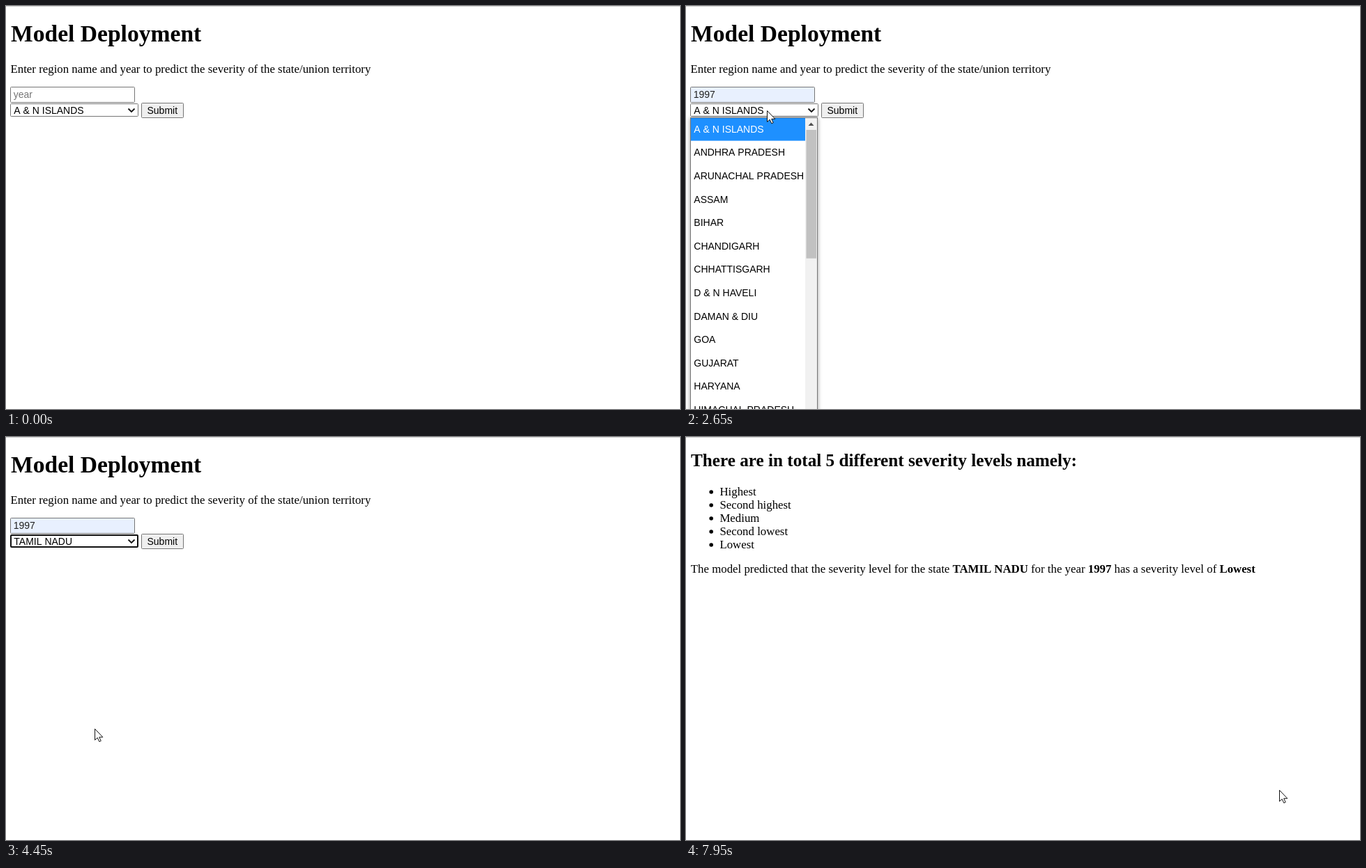
An HTML page with a canvas that plays this animation: 967x579 px, repeating every 8000 ms.

```html
<!DOCTYPE html>
<html lang="en">
<head>
<meta charset="utf-8">
<title>Model Deployment</title>
<style>
  html, body { margin: 0; width: 100%; height: 100%; overflow: hidden; background: #fff; }
  canvas { display: block; }
</style>
</head>
<body>
<canvas id="stage" width="967" height="579"></canvas>
<script>
const ctx = document.getElementById('stage').getContext('2d');
const W = 967, H = 579, LOOP = 8000;
const SERIF = '"Liberation Serif", "Times New Roman", serif';
const SANS = '"Liberation Sans", Arial, sans-serif';
const UI = '600 13px "Open Sans", "Noto Sans", sans-serif';
const BODY = '16.84px ' + SERIF, BOLD = 'bold 16.8px ' + SERIF, FORM = '14px ' + SANS;
const GRAY = '#767676', BLACK = '#101010', FILLED = '#e8f0fe';

const STATES = ['A & N ISLANDS', 'ANDHRA PRADESH', 'ARUNACHAL PRADESH', 'ASSAM', 'BIHAR',
  'CHANDIGARH', 'CHHATTISGARH', 'D & N HAVELI', 'DAMAN & DIU', 'GOA', 'GUJARAT', 'HARYANA',
  'HIMACHAL PRADESH', 'JAMMU & KASHMIR', 'JHARKHAND', 'KARNATAKA', 'KERALA', 'LAKSHADWEEP',
  'MADHYA PRADESH', 'MAHARASHTRA', 'MANIPUR', 'MEGHALAYA', 'MIZORAM', 'NAGALAND', 'ODISHA',
  'PUDUCHERRY', 'PUNJAB', 'RAJASTHAN', 'SIKKIM', 'TAMIL NADU', 'TRIPURA', 'UTTAR PRADESH',
  'UTTARAKHAND', 'WEST BENGAL'];
const CHOICE = 'TAMIL NADU';
const LEVELS = ['Highest', 'Second highest', 'Medium', 'Second lowest', 'Lowest'];

// Dropdown geometry
const ROW = 33.6, TOP = 160, VIEW = 475, TRACK = 444;
const CONTENT = ROW * STATES.length, SCROLL_START = 202.4, SCROLL_END = CONTENT - VIEW - 2;

// Moments when the page changes
const T = { focus: 800, popup: 1000, pick: 1810, blur: 2560, open: 2650, scroll: 3120,
  settled: 3480, choose: 4260, press: 5150, release: 5270, result: 5420 };

// The pointer rests between moves; it starts and ends some of them off stage
const START = { x: 880, y: 580 };
const MOVES = [
  { from: 120, to: 740, x: 128, y: 128 },
  { from: T.popup, to: 1740, x: 127, y: 204 },
  { from: T.pick, to: T.blur, x: 116, y: 150 },
  { from: T.open, to: 2970, x: 116, y: 466 },
  { from: T.settled, to: 3660, x: 101, y: 480 },
  { from: T.choose, to: 4950, x: 240, y: 154 },
  { from: 5560, to: 6250, x: 434, y: 241 },
  { from: 6390, to: 6680, x: 813, y: 485 },
  { from: 6680, to: 7210, x: 57, y: -20 },
  { from: 7210, to: 7211, x: 71, y: -20 },
  { from: 7440, to: 7950, x: 851, y: 507 }
];

const mix = (a, b, k) => a + (b - a) * k;

function ease(t, from, to) {
  const k = Math.min(1, Math.max(0, (t - from) / (to - from)));
  return k * k * (3 - 2 * k);
}

function pointerAt(t) {
  return MOVES.reduce((p, m) => {
    const k = ease(t, m.from, m.to);
    return { x: mix(p.x, m.x, k), y: mix(p.y, m.y, k) };
  }, START);
}

function scrollAt(t) {
  return t < T.scroll ? 0 : mix(SCROLL_START, SCROLL_END, ease(t, T.scroll, T.settled));
}

const inside = (p, x, y, w, h) => p.x >= x && p.x < x + w && p.y >= y && p.y < y + h;
const overField = p => inside(p, 6, 116, 179, 23);

function text(s, x, y, font, color = '#000') {
  ctx.font = font;
  ctx.fillStyle = color;
  ctx.fillText(s, x, y);
  return x + ctx.measureText(s).width;
}

function rect(x, y, w, h, color) {
  ctx.fillStyle = color;
  ctx.fillRect(x, y, w, h);
}

function box(x, y, w, h, fill, stroke, line = 1) {
  ctx.beginPath();
  ctx.roundRect(x + line / 2, y + line / 2, w - line, h - line, 1);
  ctx.fillStyle = fill;
  ctx.fill();
  ctx.strokeStyle = stroke;
  ctx.lineWidth = line;
  ctx.stroke();
}

function poly(points, x = 0, y = 0) {
  ctx.beginPath();
  points.forEach(([px, py]) => ctx.lineTo(x + px, y + py));
}

function triangle(x, y, w, h, color) {
  poly([[-w / 2, h], [w / 2, h], [0, 0]], x, y);
  ctx.fillStyle = color;
  ctx.fill();
}

function panel(x, y, w, h, radius, blur) {
  ctx.save();
  ctx.shadowColor = 'rgba(0,0,0,.4)';
  ctx.shadowBlur = blur;
  ctx.shadowOffsetY = 1;
  ctx.beginPath();
  ctx.roundRect(x, y, w, h, [0, 0, radius, radius]);
  ctx.fillStyle = '#fff';
  ctx.fill();
  ctx.restore();
}

function arrow({ x, y }) {
  poly([[0.5, 0.5], [0.5, 16.5], [4.2, 13.2], [6.8, 18.8], [9.2, 17.7], [6.7, 12.3], [11.8, 12.3]], x, y);
  ctx.closePath();
  ctx.fillStyle = '#fff';
  ctx.fill();
  ctx.strokeStyle = '#111';
  ctx.lineWidth = 1;
  ctx.stroke();
}

function beam(p) {
  const x = Math.round(p.x), y = Math.round(p.y);
  rect(x, y - 8, 1, 16, '#000');
  rect(x - 3, y - 8, 7, 1, '#000');
  rect(x - 3, y + 7, 7, 1, '#000');
}

// Index of the suggestion under the pointer, -1 for none
function suggestionAt(t, p) {
  return t >= T.popup && t < T.pick && p.y >= 149 ? Math.floor((p.y - 149) / 37.5) : -1;
}

function yearField(t, p) {
  const focused = t >= T.focus && t < T.blur;
  const value = t >= T.pick ? '1997' : ['2002', '1997'][suggestionAt(t, p)];
  box(6, 116, 179, 23, value ? FILLED : '#fff', focused ? BLACK : GRAY, focused ? 2 : 1);
  const end = text(value || 'year', 10.7, 132, FORM, value ? '#222' : '#757575');
  if (focused) rect(value ? Math.round(end) : 10, 120, 1, 15, '#000');
  if (focused || overField(p)) {
    triangle(173, 122.5, 8, 4, '#4b4b45');
    triangle(173, 133.5, 8, -4, '#4b4b45');
  }
}

function select(t) {
  const ring = t >= T.choose && t < T.press;
  box(6, 140, 184, 19, '#fff', ring ? BLACK : GRAY, ring ? 2 : 1);
  text(t >= T.choose ? CHOICE : STATES[0], 11.3, 155, FORM);
  poly([[175.5, 147.5], [180, 152], [184.5, 147.5]]);
  ctx.strokeStyle = '#111';
  ctx.lineWidth = 1.8;
  ctx.stroke();
}

function button(t, p) {
  let fill = '#efefef', stroke = GRAY;
  if (t >= T.press && t < T.release) [fill, stroke] = ['#f5f5f5', '#8d8d8d'];
  else if (inside(p, 194, 139, 61, 22)) [fill, stroke] = ['#e5e5e5', '#4f4f4f'];
  box(194, 139, 61, 22, fill, stroke);
  text('Submit', 202.5, 155, FORM);
}

function suggestions(t, p) {
  panel(6, 140, 202.5, 94, 4, 5);
  const active = suggestionAt(t, p);
  if (active >= 0) rect(6, 149 + active * 37.5, 202.5, 37, '#e8e8ea');
  ['2002', '1997'].forEach((year, i) => text(year, 18.7, 172 + i * 38, UI, '#202124'));
}

function dropdown(t, p) {
  const scroll = scrollAt(t);
  panel(6, TOP, 183, VIEW + 1, 0, 6);
  ctx.strokeStyle = GRAY;
  ctx.lineWidth = 1;
  ctx.strokeRect(6.5, TOP + 0.5, 182, VIEW);

  // The highlight follows the pointer only once scrolling has stopped
  const offset = t < T.settled ? 0 : scroll;
  const active = Math.max(0, Math.floor((p.y - TOP + offset) / ROW));
  ctx.save();
  ctx.beginPath();
  ctx.rect(7, TOP + 1, 181, H);
  ctx.clip();
  STATES.forEach((name, i) => {
    const y = TOP + i * ROW - scroll;
    if (i === active) rect(7, y, 164, ROW, '#1e90ff');
    text(name, 11.3, Math.round(y + 21.7), FORM, i === active ? '#fff' : '#000');
  });
  rect(171, TOP + 1, 17, H, '#f1f1f1');
  rect(172.5, 178 + scroll * TRACK / CONTENT, 14.5, TRACK * VIEW / CONTENT, '#c1c1c1');
  triangle(179.5, 167.5, 8, 4.5, '#505050');
  ctx.restore();
}

function formPage(t, p) {
  text('Model Deployment', 7, 51, 'bold 33.6px ' + SERIF);
  text('Enter region name and year to predict the severity of the state/union territory', 6.5, 96, BODY);
  yearField(t, p);
  select(t);
  button(t, p);
  if (t >= T.popup && t < T.pick) suggestions(t, p);
  if (t >= T.open && t < T.choose) dropdown(t, p);
}

function resultPage() {
  text('There are in total 5 different severity levels namely:', 7, 42, 'bold 25.2px ' + SERIF);
  LEVELS.forEach((name, i) => {
    const y = 84 + i * 19;
    text(name, 48.4, y, BODY);
    ctx.beginPath();
    ctx.arc(36.2, y - 5, 2.8, 0, 7);
    ctx.fill();
  });
  const runs = ['The model predicted that the severity level for the state ', CHOICE,
    ' for the year ', '1997', ' has a severity level of ', 'Lowest'];
  runs.reduce((x, run, i) => text(run, x, 195, i % 2 ? BOLD : BODY), 6.8);
}

function draw(t) {
  const p = pointerAt(t);
  rect(0, 0, W, H, '#fff');
  rect(0, 0, W, 1, '#cfcfcf');
  if (t < T.result) formPage(t, p);
  else resultPage();
  if (t < T.result && overField(p)) beam(p);
  else arrow(p);
}

const begin = performance.now();
function tick() {
  draw((performance.now() - begin) % LOOP);
  requestAnimationFrame(tick);
}
tick();
</script>
</body>
</html>
```
